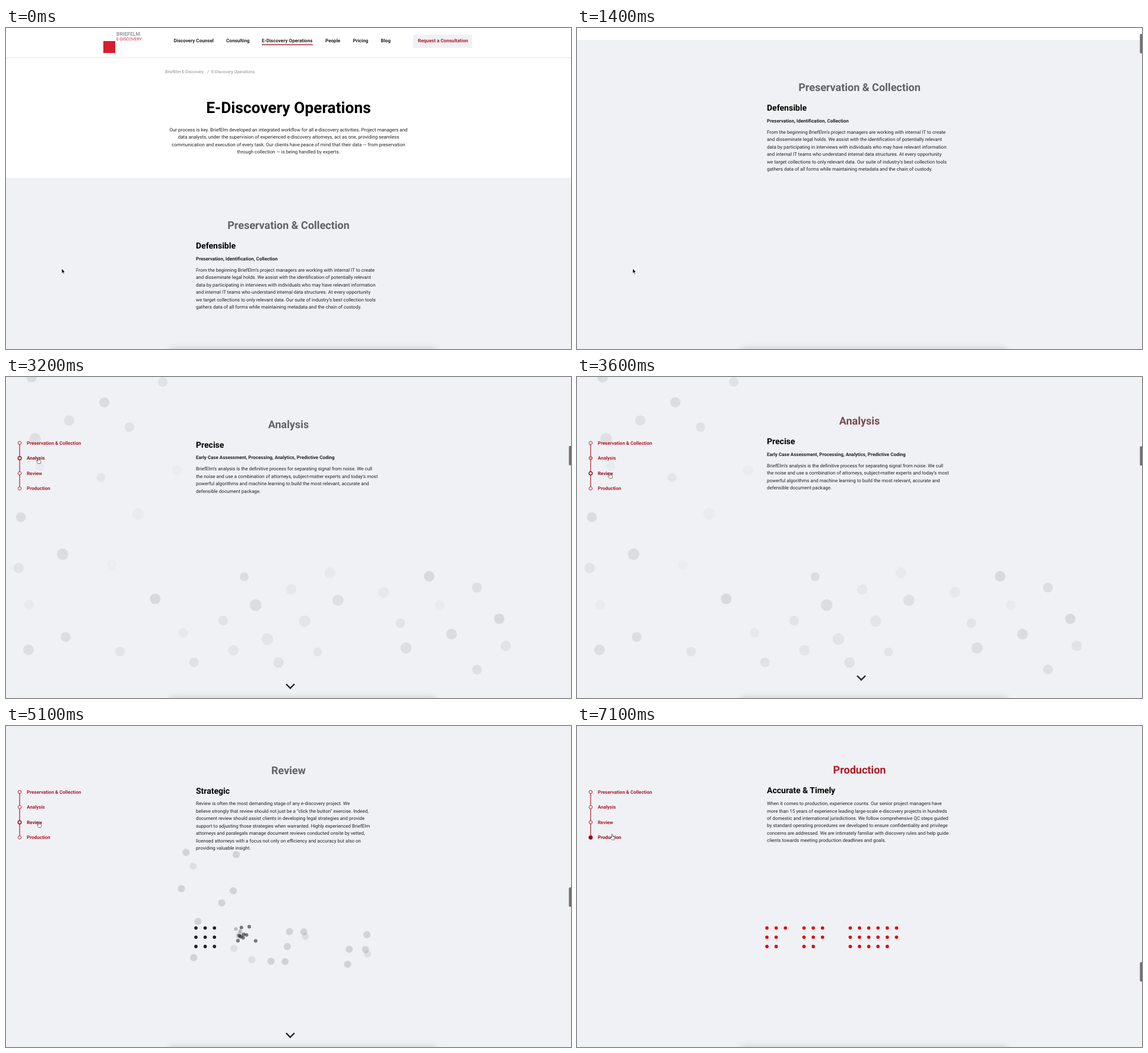
An HTML page for the animation above (7200 ms loop, 952 by 540 pixels).

```html
<!DOCTYPE html>
<html lang="en">
<head>
<meta charset="utf-8">
<title>E-Discovery Operations</title>
<style>
  html, body { margin: 0; width: 100%; height: 100%; overflow: hidden; background: #f0f1f5; }
  svg { display: block; width: 952px; height: 540px; }
  text { font-family: Roboto, Arial, sans-serif; font-size: 8px; fill: #222; text-rendering: geometricPrecision; white-space: pre; }
  .bold { font-weight: 700; }
  .mid { text-anchor: middle; }
  .menu { font-size: 8.1px; }
  .h1 { font-size: 26.3px; font-weight: 700; fill: #000; }
  .h2 { font-size: 18px; font-weight: 700; }
  .h3 { font-size: 14px; font-weight: 700; fill: #000; }
  .crumb { font-size: 7.1px; fill: #8a8a8c; }
  .brand { font-size: 8.6px; font-weight: 700; fill: #9a9a9c; }
  .tag { font-size: 7px; fill: #c8283a; }
  .red { fill: #b01a28; }
</style>
</head>
<body>
<svg viewBox="0 0 952 540">
  <defs><filter id="soft" x="-10%" y="-200%" width="120%" height="500%"><feGaussianBlur stdDeviation="6"/></filter></defs>
  <rect width="952" height="540" fill="#f0f1f5"/>
  <rect id="paper" width="952" height="252" fill="#fff"/>
  <g id="dots"></g>
  <g id="page">
    <rect x="164" y="22" width="20" height="20" fill="#d81e2c"/>
    <rect y="49.5" width="952" height="1" fill="#e4e4e6"/>
    <rect x="431" y="27.4" width="86" height="1.4" fill="#b01a28"/>
    <rect x="686" y="11" width="99.5" height="22.5" fill="#f0f1f5"/>
  </g>
  <g id="nav"><path d="M23 111V187.5" stroke="#b01a28" stroke-width="1.2"/></g>
  <path id="chevron" d="M-7-3.5 0 3.5 7-3.5" fill="none" stroke="#222" stroke-width="2.4"/>
  <rect x="277" y="540" width="447" height="24" fill="#000" opacity=".18" filter="url(#soft)"/>
  <rect id="thumb" x="948.5" width="5" height="32.5" rx="1.5" fill="#6e6e70"/>
  <path id="arrow" d="M0 0V7.6L1.8 6 3 8.8 4.2 8.3 3 5.6H5.4Z" fill="#000" stroke="#fff" stroke-width=".5"/>
  <path id="hand" d="M-1.6-4.4C-1.6-5.6 0-5.6 0-4.4V-1.2L3-.6Q4 0 3.8 1.4L3 4.6H-1.2L-3.6 1.2C-3.8.2-2.8 0-1.6 1Z" fill="#fff" stroke="#333" stroke-width=".65"/>
</svg>
<script>
const $ = id => document.getElementById(id);
const clamp = v => Math.max(0, Math.min(1, v));
const ramp = (v, a, b) => clamp((v - a) / (b - a));
const mix = (a, b, k) => a + (b - a) * k;
const inOut = k => k < .5 ? 4 * k ** 3 : 1 - 4 * (1 - k) ** 3;
const out = k => 1 - (1 - k) ** 3;
const blend = (a, b, k) => `rgb(${a.map((v, i) => Math.round(mix(v, b[i], k)))})`;
const GREY = [98, 98, 102], RED = [176, 26, 40], PALE = [240, 241, 245], DARK = [146, 16, 32];

function add(parent, tag, attrs, label) {
  const el = document.createElementNS('http://www.w3.org/2000/svg', tag);
  for (const k in attrs) el.setAttribute(k, attrs[k]);
  if (label) el.textContent = label;
  return parent.appendChild(el);
}
// y is the optical middle of the line
function write(x, y, label, cls = '', parent = $('page')) {
  const el = add(parent, 'text', { x, class: cls }, label);
  el.setAttribute('y', y + parseFloat(getComputedStyle(el).fontSize) * .35);
  return el;
}
const block = (x, y, lines, cls) => lines.forEach((l, i) => write(x, y + i * 12.45, l, cls));

// Page content
write(186, 10, 'BRIEFELM', 'brand');
write(186, 19, 'E-DISCOVERY', 'tag');
const menu = { 'Discovery Counsel': 282.5, Consulting: 371, 'E-Discovery Operations': 431, People: 538, Pricing: 584.5, Blog: 631.5 };
for (const item in menu) write(menu[item], 21, item, 'bold menu');
write(694, 21, 'Request a Consultation', 'bold menu red');
write(268, 73.5, 'BriefElm E-Discovery', 'crumb');
write(339, 73.5, '/', 'crumb');
write(346, 73.5, 'E-Discovery Operations', 'crumb');
write(476, 134, 'E-Discovery Operations', 'h1 mid');
block(476, 171, [
  'Our process is key. BriefElm developed an integrated workflow for all e-discovery activities. Project managers and',
  'data analysts, under the supervision of experienced e-discovery attorneys, act as one, providing seamless',
  'communication and execution of every task. Our clients have peace of mind that their data — from preservation',
  'through collection — is being handled by experts.'], 'mid');

const GAP = 546;
const sections = [
  { name: 'Preservation & Collection', head: 'Defensible', sub: 'Preservation, Identification, Collection', on: 1500, off: 2750, lines: [
    'From the beginning BriefElm’s project managers are working with internal IT to create',
    'and disseminate legal holds. We assist with the identification of potentially relevant',
    'data by participating in interviews with individuals who may have relevant information',
    'and internal IT teams who understand internal data structures. At every opportunity',
    'we target collections to only relevant data. Our suite of industry’s best collection tools',
    'gathers data of all forms while maintaining metadata and the chain of custody.'] },
  { name: 'Analysis', head: 'Precise', sub: 'Early Case Assessment, Processing, Analytics, Predictive Coding', on: 3500, off: 4600, lines: [
    'BriefElm’s analysis is the definitive process for separating signal from noise. We cull',
    'the noise and use a combination of attorneys, subject-matter experts and today’s most',
    'powerful algorithms and machine learning to build the most relevant, accurate and',
    'defensible document package.'] },
  { name: 'Review', head: 'Strategic', on: 5150, off: 5950, lines: [
    'Review is often the most demanding stage of any e-discovery project. We',
    'believe strongly that review should not just be a “click the button” exercise. Indeed,',
    'document review should assist clients in developing legal strategies and provide',
    'support to adjusting those strategies when warranted. Highly experienced BriefElm',
    'attorneys and paralegals manage document reviews conducted onsite by vetted,',
    'licensed attorneys with a focus not only on efficiency and accuracy but also on',
    'providing valuable insight.'] },
  { name: 'Production', head: 'Accurate & Timely', on: 6750, off: 9000, lines: [
    'When it comes to production, experience counts. Our senior project managers have',
    'more than 15 years of experience leading large-scale e-discovery projects in hundreds',
    'of domestic and international jurisdictions. We follow comprehensive QC steps guided',
    'by standard operating procedures we developed to ensure confidentiality and privilege',
    'concerns are addressed. We are intimately familiar with discovery rules and help guide',
    'clients towards meeting production deadlines and goals.'] }
];
sections.forEach((s, i) => {
  const y = 332 + GAP * i;
  s.title = write(476, y, s.name, 'h2 mid');
  write(320, y + 34.5, s.head, 'h3');
  if (s.sub) write(320, y + 56.3, s.sub, 'bold');
  block(320, y + (s.sub ? 75.2 : 56.3), s.lines);
  s.y = 111 + 25.5 * i;
  s.ring = add($('nav'), 'circle', { cx: 23, cy: s.y, r: 2.8 });
  s.link = write(35, s.y, s.name, 'bold', $('nav'));
});

// Scroll position where each pinned section is reached and released
const pins = [[258, 1282], [1828, 3607], [4153, 5496], [6042, Infinity]];
const [pres, ana, rev, prod] = pins.map(p => p[0]);
const HOVER = 697, NEAR = 3467;

// Dots drift in a loose field, gather, then settle into three grids
let seed = 11;
function random() {
  seed = (seed * 16807) % 2147483647;
  return seed / 2147483647;
}
const kinds = [
  { total: 9, slots: 9, cols: 3, left: 320, r: 2.8, mid: .87, end: .87, done: 4700 },
  { total: 11, slots: 9, cols: 3, left: 382.5, r: 3.4, mid: .5, end: .5, done: 4700 },
  { total: 22, slots: 17, cols: 6, left: 460.4, r: 8, mid: .115, end: .13, done: 5300 }];
const STEP = 15.6, dots = [];

// Even spread, denser to the left, clear of the text column
function scatter(i) {
  const u = (.5 + i * .7549) % 1, v = (.5 + i * .5698) % 1;
  const x = 40 + 860 * u ** 1.4;
  return [x, x > 300 ? 325 + 170 * v : 10 + 485 * v];
}
function goal(kind, from, slot) {
  if (kind === kinds[0]) return slot;
  if (kind === kinds[2]) return [mix(from[0], 400, .35), mix(from[1], 340, .35)];
  const turn = random() * 2 * Math.PI, far = 45 * Math.sqrt(random());
  return [400 + far * Math.cos(turn), 350 + .7 * far * Math.sin(turn)];
}
for (const kind of kinds) {
  for (let i = 0; i < kind.total; i++) {
    const from = scatter(dots.length), n = i % kind.slots;
    const col = n % kind.cols, row = Math.floor(n / kind.cols);
    const slot = [kind.left + STEP * col, 339.7 + STEP * row];
    dots.push({
      kind, from, slot, goal: goal(kind, from, slot),
      spread: .1 * random(), a: mix(.015, .1, random()), size: mix(7.5, 10, random()),
      extra: i >= kind.slots,
      cut: kind.cols === 3 && col === 2 && (row === 2 || row === 1 && kind === kinds[0]),
      el: add($('dots'), 'circle', {})
    });
  }
}

function drawDots(t, s) {
  const drift = mix(-.75, 1, ramp(s, pres, pins[0][1]));
  const near = ramp(s, ana, NEAR), shown = ramp(t, 1400, 1900), red = ramp(t, 6600, 7000);
  for (const d of dots) {
    const home = ramp(s, NEAR, d.kind.done);
    const [x, y] = d.from.map((v, i) => {
      const field = v + (v - [430, 300][i]) * d.spread * drift;
      return mix(mix(field, d.goal[i], near), d.slot[i], home);
    });
    let a = mix(mix(d.a, d.kind.mid, near), d.kind.end, home);
    a = mix(a, 1, red) * shown;
    if (d.extra) a *= 1 - home;
    if (d.cut) a *= 1 - red;
    d.el.setAttribute('cx', x);
    d.el.setAttribute('cy', y);
    d.el.setAttribute('r', mix(mix(d.size, d.kind.r, near), 2.8, home));
    d.el.setAttribute('fill', `rgba(${Math.round(226 * red)},0,${Math.round(12 * red)},${a})`);
  }
}

// Scroll moves: start, end, destination, easing
const moves = [
  [600, 1350, 232, inOut], [1400, 2200, HOVER, inOut], [2700, 3300, ana, out],
  [3600, 5150, rev, inOut], [5300, 6588, prod, inOut]];
const scrollAt = t => moves.reduce((s, [a, b, to, ease]) => mix(s, to, ease(ramp(t, a, b))), 0);
const offsetAt = s => Math.min(s, pres) + pins.slice(0, 3).reduce((sum, [, end]) => sum + GAP * ramp(s, end, end + GAP), 0);

// Pointer hops: start, end, x, y
const hops = [[1800, 2400, 55, 141], [3300, 3500, 56, 166], [5100, 5300, 60, 187]];
const pointerAt = t => hops.reduce(([x, y], [a, b, tx, ty]) => {
  const k = inOut(ramp(t, a, b));
  return [mix(x, tx, k), mix(y, ty, k)];
}, [94, 405]);

function bounce(t) {
  const p = (t / 1800 + .4) % 1;
  const hop = (a, b) => Math.sin(Math.PI * ramp(p, a, b));
  return -14 * hop(.25, .55) - 7 * hop(.55, .78);
}

const move = (id, x, y) => $(id).setAttribute('transform', `translate(${x} ${y})`);
const fade = (id, v) => $(id).setAttribute('opacity', v);

function draw(t) {
  const s = scrollAt(t), off = offsetAt(s), [px, py] = pointerAt(t);
  move('page', 0, -off);
  move('paper', 0, -off);
  drawDots(t, s);

  const hand = py < 195;
  for (const c of sections) {
    const live = ramp(t, c.on, c.on + 300) * (1 - ramp(t, c.off, c.off + 300));
    const hover = hand && Math.abs(py - 3 - c.y) < 9;
    const tone = hover ? DARK : RED;
    c.title.style.fill = blend(GREY, RED, live);
    c.ring.setAttribute('fill', blend(PALE, tone, live));
    c.ring.setAttribute('stroke', `rgb(${tone})`);
    c.ring.setAttribute('stroke-width', hover ? 1.4 : .9);
    c.link.style.fill = `rgb(${tone})`;
  }
  fade('nav', ramp(t, 1400, 1800));

  move('chevron', 479, 520 + bounce(t));
  fade('chevron', ramp(t, 1400, 1800) * (1 - ramp(t, 6400, 6700)));
  move('thumb', 0, Math.max(1, 10 + (s - 232) / 15));
  fade('thumb', ramp(t, 500, 700));
  move('arrow', px, py);
  move('hand', px, py);
  fade('arrow', hand ? 0 : 1);
  fade('hand', hand ? 1 : 0);
}

const LOOP = 7200, TICK = 100;
const begin = performance.now();
function frame() {
  const t = (performance.now() - begin) % LOOP;
  draw(Math.floor(t / TICK) * TICK);
  requestAnimationFrame(frame);
}
frame();
</script>
</body>
</html>
```
